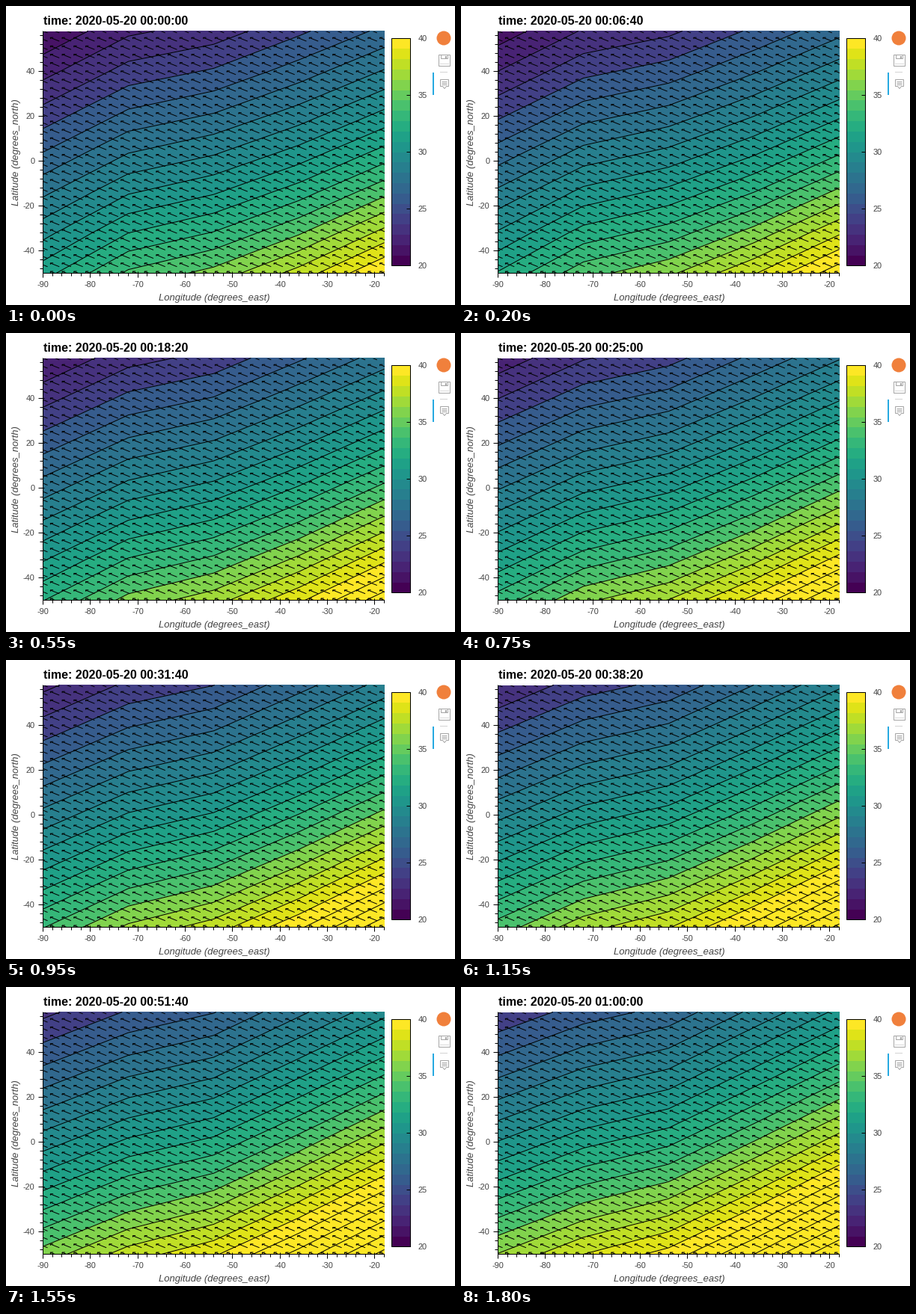
Animation, 600 px wide and 400 px high, one loop 1850 ms. Source, as a matplotlib script:

```python
import numpy as np
import matplotlib.pyplot as plt
from matplotlib.animation import FuncAnimation
from matplotlib.collections import LineCollection
from matplotlib.patches import Circle, Polygon, Rectangle

W, H, DPI = 600, 400, 100
FRAMES, INTERVAL, STEP_S = 37, 50, 100
LEFT, RIGHT, TOP, BOTTOM = 49.5, 505.5, 33.5, 357.5
WEST, EAST, SOUTH, NORTH = -90, -18, -50, 58
PX = (RIGHT - LEFT) / (EAST - WEST)
PY = (BOTTOM - TOP) / (NORTH - SOUTH)
GREY = "#444444"

plt.rcParams["font.family"] = "Liberation Sans"
fig = plt.figure(figsize=(W / DPI, H / DPI), dpi=DPI, facecolor="white")
ax = fig.add_axes([0, 0, 1, 1])
ax.set(xlim=(0, W), ylim=(H, 0))
ax.axis("off")
ax.set_autoscale_on(False)


def to_x(lon):
    return LEFT + (lon - WEST) * PX


def to_y(lat):
    return TOP + (NORTH - lat) * PY


# Pixel centres lie at .5, so snapping would push hairlines off by one.
def line(xs, ys, color="black", px=1, z=6):
    ax.plot(xs, ys, color=color, lw=px * 72 / DPI, zorder=z, snap=False,
            solid_capstyle="butt", solid_joinstyle="miter")


def label(x, y, s, px=11, color=GREY, **kw):
    kw = {"ha": "center", "va": "baseline", **kw}
    return ax.text(x, y, s, fontsize=px * 72 / DPI, color=color, **kw)


def box(x, y, w, h, fill="none", edge="none", z=5):
    ax.add_patch(Rectangle((x, y), w, h, fc=fill, ec=edge, lw=0.72,
                           zorder=z, snap=False))


# Temperature on an 18 degree grid: each column runs north to south with a sag.
lons = np.linspace(LEFT, RIGHT, 5)
lats = np.linspace(TOP, BOTTOM, 7)


def field(north, south, sag):
    u = np.linspace(0, 1, 7)[:, None]
    n, s, d = map(np.array, (north, south, sag))
    return n + (s - n) * u - 4 * d * u * (1 - u)


start = field([21.1, 22.8, 23.45, 24.8, 26.25],
              [31.6, 34.2, 35.35, 37.4, 40.1],
              [0.35, 0.55, 0.55, 0.75, 0.84])
end = field([24.15, 25.47, 26.35, 28.25, 30.25],
            [36.05, 38.0, 39.4, 42.0, 45.0],
            [0.5, 0.53, 0.6, 0.6, 0.62])

palette = plt.get_cmap("viridis")(np.linspace(0, 1, 22))
levels = np.arange(18, 50)
bands = np.clip((levels[:-1] + 0.5 - 20) * 1.1, 0, 21).astype(int)
fills = palette[bands]


def draw_arrows(n=30, angle=np.radians(140)):
    lon, lat = np.meshgrid(np.linspace(WEST, EAST, n), np.linspace(SOUTH, NORTH, n))
    size = (EAST - WEST) / (n - 1)
    dx, dy = np.cos(angle) * size / 2, np.sin(angle) * size / 2
    tip = lon + dx, lat + dy
    ends = [(lon - dx, lat - dy)]
    for turn in (-np.pi / 4, np.pi / 4):
        ends.append((tip[0] - np.cos(angle + turn) * size / 4,
                     tip[1] - np.sin(angle + turn) * size / 4))
    segs = []
    for a, b in ends:
        p = np.stack([to_x(tip[0]), to_y(tip[1])], -1)
        q = np.stack([to_x(a), to_y(b)], -1)
        segs.append(np.stack([p, q], -2).reshape(-1, 2, 2))
    arrows = LineCollection(np.concatenate(segs), colors="black", lw=0.72,
                            zorder=4, snap=False)
    ax.add_collection(arrows, autolim=False)
    arrows.set_clip_path(Rectangle((LEFT, TOP), RIGHT - LEFT, BOTTOM - TOP,
                                   transform=ax.transData))


def draw_axes():
    line([LEFT, LEFT], [TOP, BOTTOM + 0.5])
    line([LEFT - 0.5, RIGHT], [BOTTOM, BOTTOM])
    for lon in range(WEST, EAST + 1, 2):
        x = np.floor(to_x(lon)) + 0.5
        major = lon % 10 == 0
        line([x, x], [BOTTOM - 2 * major, BOTTOM + (6 if major else 4)])
        if major:
            label(x, 376, f"{lon}")
    for lat in range(-48, NORTH + 1, 4):
        y = to_y(lat)
        major = lat % 20 == 0
        line([LEFT + 2 * major, LEFT - (6 if major else 4)], [y, y])
        if major:
            label(38.5, y + 3.7, f"{lat}", ha="right")
    label(278, 394, "Longitude (degrees_east)", 13, style="italic")
    label(14, 195.5, "Latitude (degrees_north)", 13, style="italic",
          rotation=90, va="center")


def draw_colorbar():
    x, y, w, h = 515.5, 43.5, 25, 304
    step = h / len(palette)
    for i, c in enumerate(palette):
        ax.add_patch(Rectangle((x, y + h - (i + 1) * step), w, step, fc=c,
                               lw=0, antialiased=False, zorder=3))
    box(x, y, w, h, edge="black")
    for v in range(20, 41, 5):
        ty = y + (40 - v) * h / 20
        line([x + w - 5, x + w], [ty, ty])
        label(550.5, ty + 3.7, f"{v}", ha="left")


def draw_toolbar():
    ax.add_patch(Circle((585, 43), 9.5, fc="#f0803c", lw=0))
    icon = "#a6a6a6"
    box(578.5, 65.5, 15, 15, edge=icon)
    box(581.5, 65.5, 9, 5, edge=icon)
    box(587, 67, 2, 3, fill=icon)
    line([580, 592], [77.5, 77.5], "#d8d8d8")
    line([580, 590], [88.5, 88.5], "#d3d3d3")
    box(570, 89, 2, 30, fill="#26aae1")
    bubble = [(580.5, 98.5), (591.5, 98.5), (591.5, 107.5), (588.5, 107.5),
              (586, 110.5), (583.5, 107.5), (580.5, 107.5)]
    ax.add_patch(Polygon(bubble, fc="none", ec=icon, lw=0.72, snap=False))
    for y in (101.5, 103.5, 105.5):
        line([582.5, 589.5], [y, y], icon)


draw_arrows()
draw_axes()
draw_colorbar()
draw_toolbar()
title = label(49.5, 25.4, "", 16, "black", ha="left", weight="bold")
contours = []


def update(i):
    while contours:
        contours.pop().remove()
    z = start + (end - start) * i / (FRAMES - 1)
    contours.append(ax.contourf(lons, lats, z, levels, colors=fills, zorder=1))
    contours.append(ax.contour(lons, lats, z, levels, colors="black",
                               linewidths=0.72, zorder=2))
    ax.set(xlim=(0, W), ylim=(H, 0))
    sec = i * STEP_S
    title.set_text(f"time: 2020-05-20 {sec // 3600:02}:{sec // 60 % 60:02}:{sec % 60:02}")
    return [title]


anim = FuncAnimation(fig, update, frames=FRAMES, interval=INTERVAL,
                     init_func=lambda: update(0), repeat=True,
                     repeat_delay=0, blit=False)
plt.show()
```
